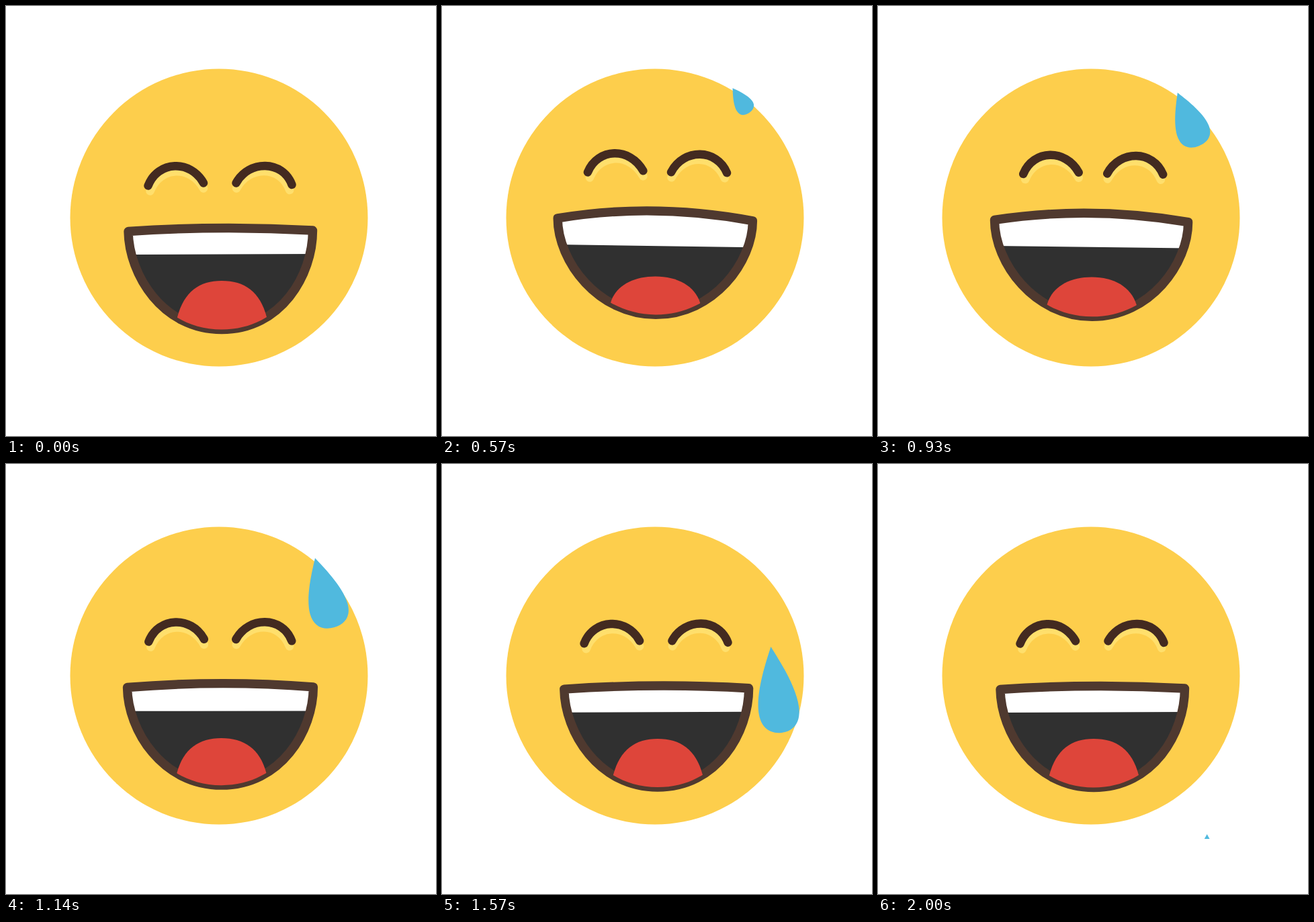
Animation, 640 px wide and 640 px high, one loop 2070 ms. Source, as an HTML page:

```html
<!DOCTYPE html>
<html lang="en">
<head>
<meta charset="utf-8">
<title>Laughing face</title>
<style>
  html, body { margin: 0; width: 100%; height: 100%; overflow: hidden; background: #fff; }
  svg { display: block; width: 100vw; height: 100vh; }
  .brow { fill: none; stroke: #432a20; stroke-width: 12.5; stroke-linecap: round; }
  .glow { stroke: #ffdf6c; }
  .lips { fill: none; stroke: #4f392f; stroke-width: 13.4; stroke-linejoin: round; }
</style>
</head>
<body>
<svg viewBox="0 0 640 640">
  <defs>
    <clipPath id="inside"><path id="hole"/></clipPath>
    <clipPath id="ground"><rect width="640" height="558"/></clipPath>
  </defs>
  <circle cx="317" cy="315" r="221.5" fill="#fdce4c"/>
  <path id="glowL" class="brow glow"/>
  <path id="glowR" class="brow glow"/>
  <path id="eyeL" class="brow"/>
  <path id="eyeR" class="brow"/>
  <path id="mouth" fill="#303030"/>
  <path id="teeth" fill="#fff" clip-path="url(#inside)"/>
  <path id="lips" class="lips"/>
  <path id="tongue" fill="#de453a" clip-path="url(#inside)"/>
  <g clip-path="url(#ground)">
    <path id="drop" fill="#50b9de" d="M0 0C-.116 .12 -.5 .48 -.5 .73C-.5 .92 -.28 1 0 1C.28 1 .5 .92 .5 .73C.5 .48 .116 .12 0 0Z"/>
  </g>
</svg>
<script>
const LOOP = 2070;
const part = id => document.getElementById(id);

// Each shape: command letters with point counts, resting points, raised points
const shapes = {
  mouth: ['M1 Q2 C3 C3 Z0',
    [182,335.5, 320,326.2, 456.5,334, 456.5,400, 410,481.5, 321,481.5, 233,481.5, 183,400, 182,335.5],
    [172,315.5, 314,291.5, 462.5,319.5, 462.5,380, 405,459, 318,459, 233,459, 172,380, 172,315.5]],
  teeth: ['M1 L1 L1 L1 Z0',
    [160,370.2, 480,368.8, 480,300, 160,300],
    [160,354.6, 480,359.4, 480,280, 160,280]],
  tongue: ['M1 C3 C3 L1 L1 Z0',
    [255,463, 265,425, 288,409, 321,409, 355,409, 378,425, 388,463, 388,500, 255,500],
    [251,441, 258,417, 284,402.5, 317.5,402.5, 351,402.5, 376,417, 384,441, 384,500, 251,500]],
  eyeL: ['M1 C3',
    [211.5,267.5, 226,230, 275,228.5, 294,263.5],
    [217,247, 232,210.5, 280,209.5, 299.5,245]],
  eyeR: ['M1 C3',
    [342.5,263.5, 361,229, 412,229, 425.5,266],
    [341,247, 360,211, 409,212, 424,248]]
};

// The glow is the same arc, lower and a little narrower
function addGlow(name, eye, left, right) {
  const shift = [left, 8, left, 8, right, 8, right, 8];
  const [cmds, rest, up] = shapes[eye];
  const move = pts => pts.map((v, i) => v + shift[i]);
  shapes[name] = [cmds, move(rest), move(up)];
}
addGlow('glowL', 'eyeL', 3, 0);
addGlow('glowR', 'eyeR', 0.5, -3.3);

function morph([cmds, rest, up], s) {
  let i = 0;
  return cmds.split(' ').map(c => {
    const end = i + 2 * c[1];
    let out = c[0];
    for (; i < end; i++) out += (rest[i] + (up[i] - rest[i]) * s).toFixed(2) + ' ';
    return out;
  }).join('');
}

// Tear keys: tick, tip x, tip y, tilt, width, length
const tear = [
  [5, 427, 119, 42, 0, 0],
  [9, 428, 120, 40, 9, 16],
  [24, 439, 125, 27, 42, 69],
  [34, 460, 140, 15.2, 58, 107],
  [43, 481, 173, 11, 63.5, 122],
  [51, 494, 400, 3.5, 57.5, 133],
  [60, 489.7, 551, 0, 75, 133]
];

// Monotone cubic through the keys of one column
function curve(col, n) {
  const last = tear.length - 1;
  const slope = i => (tear[i + 1][col] - tear[i][col]) / (tear[i + 1][0] - tear[i][0]);
  const tangent = i => {
    if (i === 0) return slope(0);
    if (i === last) return slope(last - 1);
    const a = slope(i - 1), b = slope(i);
    return a * b > 0 ? 2 * a * b / (a + b) : 0;
  };
  let i = 0;
  while (i < last - 1 && n > tear[i + 1][0]) i++;
  const h = tear[i + 1][0] - tear[i][0];
  const t = Math.min(1, Math.max(0, (n - tear[i][0]) / h));
  const ease = t * t * (3 - 2 * t);
  return tear[i][col] * (1 - ease) + tear[i + 1][col] * ease
    + h * t * (1 - t) * ((1 - t) * tangent(i) - t * tangent(i + 1));
}

// Laugh bounce: up for 6 ticks, down for 6
function bounce(n) {
  const p = n % 12 / 6;
  const d = p > 1 ? 2 - p : p;
  return d < 0.5 ? 4 * d ** 3 : 1 - 4 * (1 - d) ** 3;
}

function draw(n) {
  const s = bounce(n);
  for (const id in shapes) part(id).setAttribute('d', morph(shapes[id], s));
  const outline = part('mouth').getAttribute('d');
  part('lips').setAttribute('d', outline);
  part('hole').setAttribute('d', outline);

  const [x, y, tilt, w, len] = [1, 2, 3, 4, 5].map(col => curve(col, n));
  const drop = part('drop');
  drop.setAttribute('visibility', len > 0.5 ? 'visible' : 'hidden');
  drop.setAttribute('transform', `translate(${x} ${y}) rotate(${-tilt}) scale(${w} ${len})`);
}

// Motion runs on 30 ticks a second, shown 14 times a second
let shown = -1;
const start = performance.now();
function tick() {
  const t = (performance.now() - start) % LOOP;
  const step = Math.floor((Math.floor(t / 10) * 10 + 5) * 0.014);
  if (step !== shown) {
    shown = step;
    draw(Math.round(step * 30 / 14));
  }
  requestAnimationFrame(tick);
}
tick();
</script>
</body>
</html>
```
